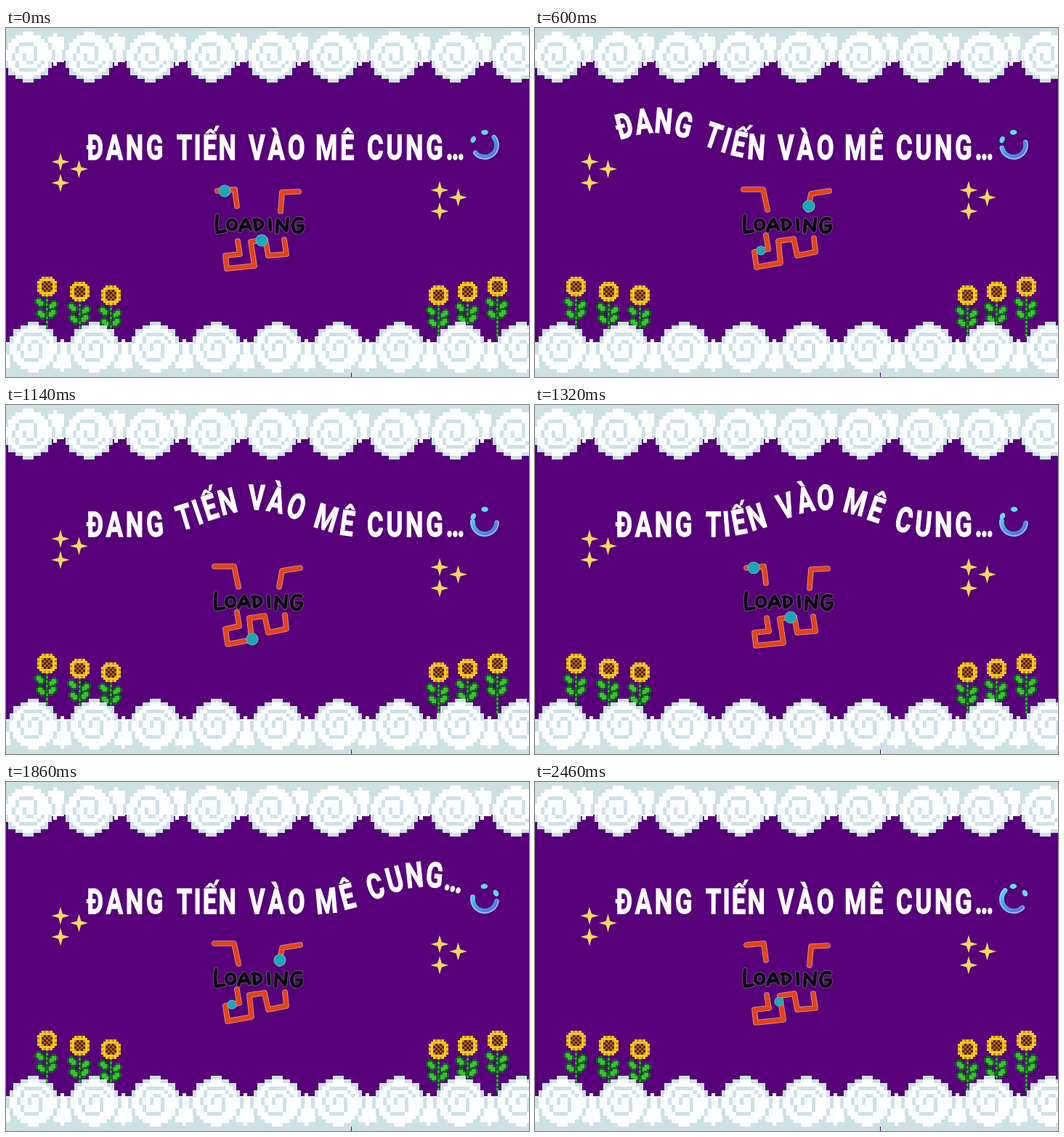
These frames come from a looping animation (720x480 px, 2.52 s). An HTML page with a canvas:

```html
<!DOCTYPE html>
<html lang="vi">
<head>
<meta charset="utf-8">
<style>
html, body { margin: 0; width: 100%; height: 100%; overflow: hidden; background: #570079; }
canvas { display: block; }
</style>
</head>
<body>
<canvas id="stage" width="720" height="480"></canvas>
<script>
const LOOP = 2520, HALF = LOOP / 2, STEP = 60, TAU = Math.PI * 2, DEG = Math.PI / 180;
const PURPLE = '#570079', SHADE = '#cde1e5', WHITE = '#fdffff';
const ctx = document.getElementById('stage').getContext('2d');

function rect(g, color, x, y, w, h) {
  g.fillStyle = color;
  g.fillRect(x, y, w, h);
}

function disc(g, color, x, y, r) {
  g.fillStyle = color;
  g.beginPath();
  g.arc(x, y, r, 0, TAU);
  g.fill();
}

// Linear interpolation through [time, ...values] keys.
function sample(keys, t) {
  const i = keys.findIndex(k => k[0] > t);
  if (i < 1) return null;
  const a = keys[i - 1], b = keys[i], u = (t - a[0]) / (b[0] - a[0]);
  return a.slice(1).map((v, n) => v + (b[n + 1] - v) * u);
}

// Calls paint(i, j) on a centred grid; a returned colour fills that cell.
function pixels(g, cx, cy, cell, reach, paint) {
  const half = Math.floor(cell / 2);
  for (let j = -reach; j <= reach; j++) {
    for (let i = -reach; i <= reach; i++) {
      const color = paint(i, j);
      if (color) rect(g, color, cx + i * cell - half, cy + j * cell - half, cell, cell);
    }
  }
}

// ---------- still scenery ----------

function swirl(g, cx, cy, turn) {
  pixels(g, cx, cy, 5, 7, (i, j) => {
    const r = Math.hypot(i, j);
    if (r > 7.15) return null;
    if (r > 6.2) return SHADE;
    const coil = (r / 2.8 - Math.atan2(j, i) * turn / TAU + 4) % 1;
    return r < 4.6 && coil > 0.64 ? SHADE : WHITE;
  });
}

function puff(g, cx, cy) {
  pixels(g, cx, cy, 5, 4, (i, j) => Math.hypot(i / 2.9, j / 4.1) <= 1.02 ? WHITE : null);
}

function cloudBands(g) {
  rect(g, SHADE, 0, 0, 720, 45);
  rect(g, SHADE, 0, 432, 720, 48);
  for (let k = -1; k < 9; k++) {
    const x = 84 * k;
    puff(g, 67 + x, 29);
    swirl(g, 30 + x, 37, -1);
    puff(g, 77 + x, 450);
    swirl(g, 37 + x, 441, 1);
  }
  rect(g, PURPLE, 475, 474, 1, 6);
}

function leaf(g, x, y, side) {
  pixels(g, x, y, 3, 2, (i, j) => {
    const across = Math.abs(j - side * i), along = Math.abs(j + side * i);
    if (across > 2 || along > 3) return null;
    return across > 1 || along > 2 ? '#0d6a1c' : '#3cc22e';
  });
}

function sunflower(g, x, y) {
  rect(g, '#0f641f', x - 1, y + 10, 3, 62);
  for (let d = 12; d < 70; d += 6) rect(g, '#35ad2c', x - 1, y + d, 3, 3);
  leaf(g, x - 10, y + 22, 1);
  leaf(g, x + 8, y + 26, -1);
  leaf(g, x - 8, y + 38, 1);
  leaf(g, x + 7, y + 37, -1);
  pixels(g, x, y, 3, 4, (i, j) => {
    const r = Math.hypot(i, j), odd = (i + j) % 2 !== 0;
    if (r > 4.5) return null;
    if (r < 2.3) return odd ? '#4b230f' : '#b3661c';
    if (r < 3) return '#d98f14';
    return r > 4 && odd ? '#c98a12' : '#f6cb15';
  });
}

function sparkle(g, x, y) {
  g.fillStyle = '#f5d862';
  g.beginPath();
  for (let k = 0; k < 8; k++) {
    const r = k % 2 ? 4 : 12.5;
    g.lineTo(x + r * Math.cos(k * TAU / 8), y + r * Math.sin(k * TAU / 8));
  }
  g.fill();
}

function paintScenery() {
  const layer = document.createElement('canvas');
  layer.width = 720;
  layer.height = 480;
  const g = layer.getContext('2d');
  rect(g, PURPLE, 0, 0, 720, 480);
  for (const [x, y] of [[75, 184], [597, 223]]) {
    sparkle(g, x, y);
    sparkle(g, x + 25.5, y + 10);
    sparkle(g, x, y + 29);
  }
  [[56, 355], [101, 362], [144, 367], [595, 367], [635, 362], [676, 355]]
    .forEach(([x, y]) => sunflower(g, x, y));
  cloudBands(g);
  return layer;
}

// ---------- title wave ----------

const TITLE_FONT = 'bold 48px Roboto, "Open Sans", sans-serif';
const CONDENSE = 0.72;
const WORDS = [['ĐANG', 111, 3.8], ['TIẾN', 235, 2.2], ['VÀO', 334, 4], ['MÊ', 426, 3.8], ['CUNG…', 497, 3.8]];

function layoutTitle() {
  ctx.font = TITLE_FONT;
  return WORDS.flatMap(([word, start, tracking]) => {
    let x = start;
    return [...word].map(char => {
      const w = ctx.measureText(char).width * CONDENSE;
      const glyph = { char, x: x + w / 2 };
      x += w + tracking;
      return glyph;
    });
  });
}

function drawTitle(t) {
  const crest = 166 + 0.326 * (t - 600), reach = 148, height = 37;
  ctx.font = TITLE_FONT;
  ctx.textAlign = 'center';
  ctx.fillStyle = ctx.strokeStyle = '#fff';
  ctx.lineWidth = 1.3;
  ctx.lineJoin = 'miter';
  for (const { char, x } of glyphs) {
    const phase = Math.max(-1, Math.min(1, (x - crest) / reach)) * Math.PI;
    const lift = height * (1 + Math.cos(phase)) / 2;
    const slope = height / 2 * Math.PI / reach * Math.sin(phase);
    ctx.save();
    ctx.translate(x, 164 - lift);
    ctx.rotate(Math.atan(slope) * 0.88);
    ctx.scale(CONDENSE, 1);
    ctx.fillText(char, 0, 17);
    ctx.strokeText(char, 0, 17);
    ctx.restore();
  }
}

// ---------- smiling ring ----------

// Time, turn of the mouth, direction of the eyes.
const RING_TURN = [[0, -40, -122], [900, 0, -124], [1320, 5, -120], [1860, 10, -60], [2220, 38, -60], [2520, 47, -60]];

function drawSmile(t) {
  const [turn, gaze] = sample(RING_TURN, t);
  const blend = ctx.createLinearGradient(-14, -14, 12, 18);
  blend.addColorStop(0, '#58dcf2');
  blend.addColorStop(0.45, '#3fa4ea');
  blend.addColorStop(1, '#5474e4');
  const arc = (color, r, width) => {
    ctx.strokeStyle = color;
    ctx.lineWidth = width;
    ctx.lineCap = 'round';
    ctx.beginPath();
    ctx.arc(0, 0, r, turn * DEG, (turn + 180) * DEG);
    ctx.stroke();
  };
  ctx.save();
  ctx.translate(659, 161);
  arc('#a9c0f6', 16.7, 6.5);
  arc(blend, 15.8, 5);
  ctx.fillStyle = '#62dcee';
  for (const angle of [gaze - 32, gaze + 32]) {
    ctx.beginPath();
    ctx.ellipse(17.5 * Math.cos(angle * DEG), 17.5 * Math.sin(angle * DEG), 3.4, 4.8, angle * DEG, 0, TAU);
    ctx.fill();
  }
  ctx.restore();
}

// ---------- loading maze ----------

const LETTERING = new Path2D(
  'M291 258Q289 270 291 281L302 279' +
  'M311 264C303 264 303 277 311 277C319 277 319 264 311 264' +
  'M322 279Q326 266 330 263Q334 270 337 277M325 274L334 273' +
  'M343 265L344 278Q355 274 353 268Q349 262 341 264' +
  'M363 263L364 278' +
  'M373 281L374 264L386 279L388 262' +
  'M408 263Q398 259 395 270Q395 282 403 281Q409 279 409 272L402 272');

const MAZE_REST = new Path2D(
  'M291 224L315 222L318 245M403 225L380 226L378 252' +
  'M319 293L322 311L302 313L304 331L342 327L337 294L357 291L361 313L386 311L383 291');
const MAZE_WIDE = new Path2D(
  'M287 222L314 222L320 250M405 224L380 228L376 250' +
  'M318 285L321 304L302 308L305 329L338 323L335 293L356 290L361 313L386 308L384 289');

// One trip through the maze; a second ball follows half a loop behind.
const TRIP = [
  [0, 301, 224], [120, 316, 227], [240, 318, 248], [420, 318, 280], [540, 320, 303],
  [600, 311, 306], [720, 302, 311], [840, 305, 327], [960, 327, 326], [1080, 339, 322],
  [1200, 336, 302], [1260, 352, 292], [1380, 360, 312], [1500, 385, 309], [1620, 383, 287],
  [1740, 379, 266], [1860, 377, 245], [2100, 380, 226], [2220, 405, 221], [2280, 408, 220]
];

function outlined(path, color, width, rim) {
  ctx.lineCap = ctx.lineJoin = 'round';
  ctx.strokeStyle = rim;
  ctx.lineWidth = width + 1.6;
  ctx.stroke(path);
  ctx.strokeStyle = color;
  ctx.lineWidth = width;
  ctx.stroke(path);
}

// The doodle is redrawn on every second step.
function drawMaze(t) {
  const hold = 2 * STEP, phase = Math.floor(t % HALF / hold) * hold;
  const rest = phase < 240 || phase >= 1140;
  outlined(rest ? MAZE_REST : MAZE_WIDE, '#e6430f', 6, '#d3a4b4');
  for (const age of [phase, phase + HALF]) {
    const spot = sample(TRIP, age);
    if (!spot) continue;
    const r = age >= 600 && age < 780 || age >= 1140 && age < 1230 ? 6 : 8;
    disc(ctx, '#7fa9b9', ...spot, r + 0.6);
    disc(ctx, '#17a9b6', ...spot, r - 0.5);
  }
  ctx.save();
  ctx.translate(phase < 120 ? 0 : -1.8, 0);
  outlined(LETTERING, '#0d0910', 4.6, '#79598c');
  ctx.restore();
}

const scenery = paintScenery();
const glyphs = layoutTitle();

function frame(now) {
  const t = Math.floor(now % LOOP / STEP) * STEP;
  ctx.drawImage(scenery, 0, 0);
  drawTitle(t);
  drawSmile(t);
  drawMaze(t);
  requestAnimationFrame(frame);
}
frame(0);
</script>
</body>
</html>
```
